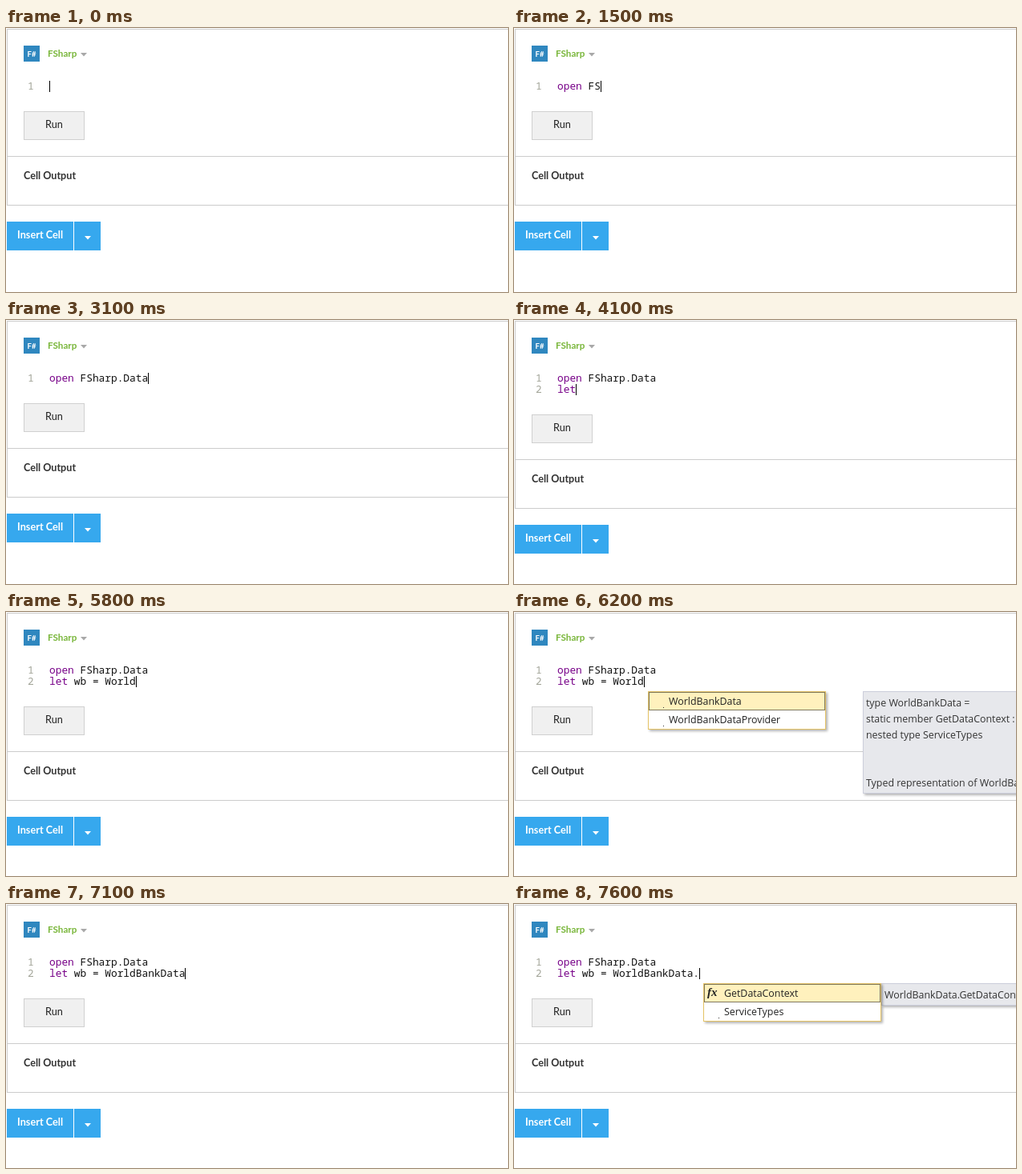
An HTML page with a canvas for the animation above (8000 ms loop, 626 by 330 pixels).

```html
<!DOCTYPE html>
<html lang="en">
<head>
<meta charset="utf-8">
<title>Notebook cell with code completion</title>
<style>
  html, body { margin: 0; width: 100%; height: 100%; overflow: hidden; background: #fff; }
  canvas { display: block; }
</style>
</head>
<body>
<canvas id="stage" width="626" height="330"></canvas>
<script>
const ctx = document.getElementById('stage').getContext('2d');
const LOOP = 8000;
const CODE_X = 54, CODE_TOP = 66, LINE = 14, CHAR = 7.7;
const UI = 'Lato, sans-serif';
const CODE_FONT = '12.833px "Noto Sans Mono", monospace';
const LIST_FONT = '12.4px "Open Sans", sans-serif';
const KEYWORDS = ['open', 'let'];

const namespaces = {
  x: 151, y: 85,
  items: [['angles', 'Charting'], ['angles', 'Data']],
  tip: { x: 373, w: 208, h: 28, lines: ['namespace FSharp.Charting'] }
};
const dataOnly = {
  ...namespaces,
  items: [['angles', 'Data']],
  tip: { ...namespaces.tip, lines: ['namespace FSharp.Data'] }
};
const types = {
  x: 167, y: 99,
  items: [['dot', 'WorldBankData'], ['dot', 'WorldBankDataProvider']],
  tip: {
    x: 435, w: 300, h: 128,
    lines: ['type WorldBankData =', 'static member GetDataContext : unit', 'nested type ServiceTypes',
            '', '', 'Typed representation of WorldBank data']
  }
};
const members = {
  x: 236, y: 99,
  items: [['fx', 'GetDataContext'], ['dot', 'ServiceTypes']],
  tip: { x: 458, w: 300, h: 28, lines: ['WorldBankData.GetDataContext'] }
};

// Each step: start time, code, completion popup, caret hidden
const first = 'open FSharp.Data\n';
const steps = [
  [0, ''], [600, '', null, true],
  [900, 'o'], [1000, 'op'], [1100, 'open'], [1200, 'open '],
  [1400, 'open F'], [1500, 'open FS'],
  [1700, 'open FSh'], [1800, 'open FSha'], [1900, 'open FShar'], [2000, 'open FSharp'],
  [2100, 'open FSharp.'], [2200, 'open FSharp.', namespaces],
  [2500, 'open FSharp.D', dataOnly], [2600, 'open FSharp.Da', dataOnly],
  [2700, 'open FSharp.Dat', dataOnly], [3100, 'open FSharp.Data'],
  [3500, first], [3900, first + 'l'], [4100, first + 'let'], [4200, first + 'let '],
  [4400, first + 'let w'], [4600, first + 'let wb'], [5000, first + 'let wb ='],
  [5200, first + 'let wb = '], [5300, first + 'let wb = W'],
  [5500, first + 'let wb = Wo'], [5600, first + 'let wb = Wor'],
  [5700, first + 'let wb = Worl'], [5800, first + 'let wb = World'],
  [6200, first + 'let wb = World', types], [6400, first + 'let wb = World', types, true],
  [6700, first + 'let wb = Worldb', types],
  [7100, first + 'let wb = WorldBankData'],
  [7500, first + 'let wb = WorldBankData.'], [7600, first + 'let wb = WorldBankData.', members]
];

function rect(x, y, w, h, color) {
  ctx.fillStyle = color;
  ctx.fillRect(x, y, w, h);
}

function outline(x, y, w, h, color) {
  ctx.strokeStyle = color;
  ctx.lineWidth = 1;
  ctx.strokeRect(x + 0.5, y + 0.5, w - 1, h - 1);
}

function text(str, x, y, font, color, align = 'left') {
  ctx.font = font;
  ctx.fillStyle = color;
  ctx.textAlign = align;
  ctx.fillText(str, x, y);
}

function arrow(x, y, color) {
  ctx.fillStyle = color;
  ctx.beginPath();
  ctx.moveTo(x, y);
  ctx.lineTo(x + 8, y);
  ctx.lineTo(x + 4, y + 4.5);
  ctx.fill();
}

function shadowBox(x, y, w, h, fill, border) {
  ctx.save();
  ctx.shadowColor = 'rgba(0,0,0,.3)';
  ctx.shadowOffsetX = ctx.shadowOffsetY = 2;
  ctx.shadowBlur = 3;
  rect(x, y, w, h, fill);
  ctx.restore();
  outline(x, y, w, h, border);
}

function drawHeader() {
  rect(22, 22, 20, 20, '#2f87bf');
  text('F#', 32, 36, `bold 9.5px ${UI}`, '#fff', 'center');
  text('FSharp', 52, 36, `bold 11.7px ${UI}`, '#79b63a');
  arrow(93, 31, '#a8a8a8');
}

function drawFooter(shift) {
  ctx.save();
  ctx.translate(0, shift);
  rect(22, 104, 76, 36, '#f0f0f0');
  outline(22, 104, 76, 36, '#d0d0d0');
  text('Run', 60, 125, `12.7px ${UI}`, '#222', 'center');
  rect(1, 160, 625, 1, '#ccc');
  text('Cell Output', 22, 189, `bold 12.6px ${UI}`, '#333');
  rect(1, 221, 625, 1, '#ccc');
  rect(1, 242, 83, 36, '#36a8ee');
  rect(85, 242, 33, 36, '#36a8ee');
  text('Insert Cell', 14, 263, `bold 12.7px ${UI}`, '#fff');
  arrow(98, 260, '#fff');
  ctx.restore();
  rect(1, 1, 625, 1, '#ccc');
  rect(1, 1, 1, 221 + shift, '#ccc');
}

function drawCode(lines, caretHidden) {
  lines.forEach((line, i) => {
    const base = CODE_TOP + 11 + i * LINE;
    text(String(i + 1), 27, base, CODE_FONT, '#a2a498');
    const word = line.split(' ')[0];
    const head = KEYWORDS.includes(word) ? word : '';
    text(head, CODE_X, base, CODE_FONT, '#770088');
    text(line.slice(head.length), CODE_X + head.length * CHAR, base, CODE_FONT, '#111');
  });
  if (caretHidden) return;
  const row = lines.length - 1;
  rect(Math.round(CODE_X + lines[row].length * CHAR), CODE_TOP + row * LINE, 1, LINE, '#000');
}

function drawIcon(kind, x, y) {
  if (kind === 'dot') {
    rect(x + 19, y + 20, 1, 1, '#333');
  } else if (kind === 'fx') {
    text('fx', x + 5, y + 16, 'italic bold 15px "Liberation Serif", serif', '#222');
  } else {
    ctx.strokeStyle = '#111';
    ctx.lineWidth = 2;
    ctx.beginPath();
    for (const side of [-1, 1]) {
      ctx.moveTo(x + 12 + side * 2, y + 7);
      ctx.lineTo(x + 12 + side * 7, y + 12);
      ctx.lineTo(x + 12 + side * 2, y + 17);
    }
    ctx.stroke();
  }
}

function drawPopup({ x, y, items, tip }) {
  shadowBox(tip.x, y, tip.w, tip.h, '#e7e8ec', '#cccedb');
  tip.lines.forEach((line, i) => text(line, tip.x + 4, y + 19 + i * 20, LIST_FONT, '#333'));

  shadowBox(x, y, 222, items.length * 23 + 2, '#fff', '#e5c365');
  rect(x + 1, y + 1, 220, 23, '#fff1bd');
  ctx.setLineDash([1, 1]);
  outline(x + 1, y + 1, 220, 23, '#000');
  ctx.setLineDash([]);
  items.forEach(([icon, label], i) => {
    const top = y + i * 23;
    drawIcon(icon, x, top);
    text(label, x + 26, top + 17, LIST_FONT, '#222');
  });
}

function draw(time) {
  const [, code, popup, caretHidden] = steps.findLast(step => step[0] <= time);
  const lines = code.split('\n');
  rect(0, 0, 626, 330, '#fff');
  drawHeader();
  drawFooter((lines.length - 1) * LINE);
  drawCode(lines, caretHidden);
  if (popup) drawPopup(popup);
}

function tick() {
  draw(performance.now() % LOOP);
  requestAnimationFrame(tick);
}
tick();
</script>
</body>
</html>
```
